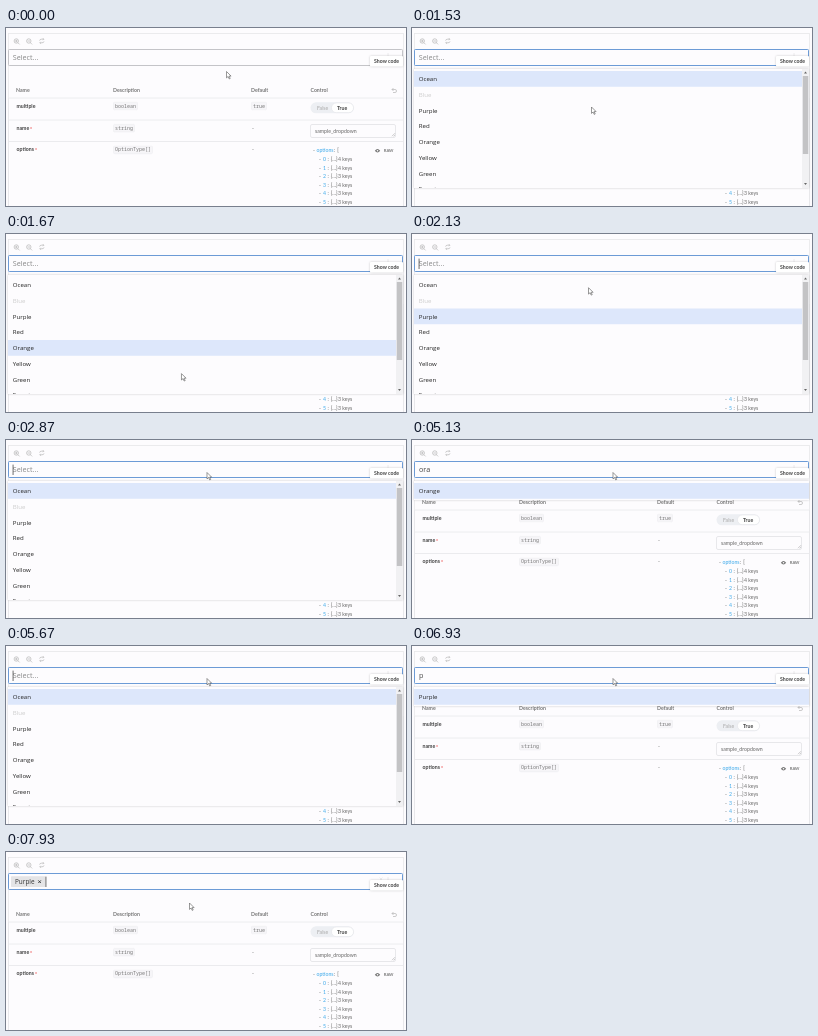
Recreate the animation shown at these times as an HTML page. Size 400 px wide and 178 px high, loop 8000 ms.

```html
<!DOCTYPE html>
<html lang="en">
<head>
<meta charset="utf-8">
<title>Dropdown demo</title>
<style>
  html, body { margin: 0; width: 100%; height: 100%; overflow: hidden; background: #fdfcfe; }
  svg { display: block; }
  text { font-family: Lato, sans-serif; font-size: 5.2px; fill: #666; white-space: pre; }
  .b { font-weight: 700; fill: #444; }
  .head { font-weight: 700; fill: #777; }
  .ui { font-family: "Open Sans", sans-serif; font-size: 6.1px; fill: #222; }
  .tag { font-family: "Open Sans", sans-serif; font-size: 6.4px; fill: #333; }
  .input { font-family: "Open Sans", sans-serif; font-size: 7.2px; fill: #444; }
  .mono { font-family: "Noto Sans Mono", monospace; font-size: 5px; fill: #777; }
  .key { fill: #3aa8ea; }
  .dim { fill: #aaa; }
  .line { fill: none; stroke: #e8e8ea; stroke-width: .8; }
  .icon { fill: none; stroke: #aaa; stroke-width: .6; }
  .shadow { filter: drop-shadow(0 .6px .8px #0003); }
</style>
</head>
<body>
<svg id="stage" width="100%" height="100%" viewBox="0 0 400 178"></svg>
<script>
const PAPER = '#fdfcfe';
const text = (x, y, s, cls = '') => `<text x="${x}" y="${y}" class="${cls}">${s}</text>`;
const rect = (x, y, w, h, fill, more = '') =>
  `<rect x="${x}" y="${y}" width="${w}" height="${h}" fill="${fill}" ${more}/>`;
const path = (d, cls, more = '') => `<path d="${d}" class="${cls}" ${more}/>`;
const chip = (x, y, s) =>
  rect(x, y - 5.3, s.length * 3 + 3, 7.6, '#f6f5f8', 'rx="1" stroke="#ededf0" stroke-width=".6"') +
  text(x + 1.5, y, s, 'mono');
const star = (x, y) => `<text x="${x}" y="${y + .6}" class="b" style="fill:#e66;font-size:6px">*</text>`;
const lens = (x, sign) =>
  path(`M${x + 2} 13a2.2 2.2 0 1 0-4.4 0a2.2 2.2 0 1 0 4.4 0M${x + 1.4} 14.7l1.7 1.7${sign}`, 'icon');

function page() {
  let s = rect(2.5, 5.5, 395, 200, PAPER, 'stroke="#e8e8ea" stroke-width=".8"');
  s += lens(10.5, 'M9.1 13h2.4M10.3 11.8v2.4') + lens(23, 'M21.6 13h2.4');
  s += path('M33.6 12.6q.2-1.4 2-1.4h2M36.9 10.2l1 1l-1 1M38 13.4q-.2 1.4-2 1.4h-2M34.7 13.8l-1 1l1 1', 'icon');
  s += [[10, 'Name'], [107, 'Description'], [245, 'Default'], [304.5, 'Control']]
    .map(([x, t]) => text(x, 63.5, t, 'head')).join('');
  s += path('M387.5 60l-1.5 1.5l1.5 1.5M386 61.5h3a1.5 1.5 0 0 1 0 3h-2', 'icon');
  s += path('M2.5 178V70H397.5V178M2.5 92H397.5M2.5 113.5H397.5', 'line');

  s += text(10.5, 79.5, 'multiple', 'b') + chip(107.5, 79.5, 'boolean') + chip(245.5, 79.5, 'true');
  s += rect(304.5, 74.3, 43.5, 11, '#edeff3', 'rx="5.5"');
  s += rect(325.5, 75, 22, 9.6, '#fff', 'rx="4.8" stroke="#e0e0e4" stroke-width=".5"');
  s += text(311, 81.6, 'False', 'dim') + text(331, 81.6, 'True', 'b');

  s += text(10.5, 102, 'name', 'b') + star(23.7, 102) + chip(107.5, 101.7, 'string') + text(246, 101.7, '-');
  s += rect(304.5, 96.5, 85, 13, PAPER, 'rx="1.5" stroke="#e2e2e6" stroke-width=".8"');
  s += text(309, 105, 'sample_dropdown') + path('M386 108.2l3-3M387.7 108.4l1.4-1.4', 'icon');

  s += text(10.5, 123.4, 'options', 'b') + star(28.8, 123.4) + chip(107.5, 123.4, 'OptionType[]') + text(246, 123.4, '-');
  s += text(307, 124, '-') + text(310.5, 124, 'options', 'key') + text(328, 124, ':') + text(331.3, 124, '[');
  [4, 4, 3, 4, 3, 3].forEach((n, i) => {
    const y = 133 + i * 8.6;
    s += text(313, y, '-') + text(317, y, i, 'key') + text(321.5, y, ':') +
      text(324.7, y, '{...}') + text(332, y, `${n} keys`);
  });
  s += rect(366, 118, 24, 9.5, PAPER, 'rx="1"');
  s += path('M368.8 122.8q2.7-3.6 5.4 0q-2.7 3.6-5.4 0', '', 'fill="#777"') + '<circle cx="371.5" cy="122.8" r=".8" fill="#fff"/>';
  s += `<text x="377.7" y="124.3" class="head" style="font-size:4.2px">RAW</text>`;
  return s;
}

const showCode =
  rect(364, 28, 33, 10.5, '#fff', 'rx="1" class="shadow"') + text(368, 35.1, 'Show code', 'b');

const stage = document.getElementById('stage');
stage.innerHTML = page() + '<g id="field"></g>' + showCode + '<g id="menu" class="shadow"></g>' +
  '<path id="cursor" d="M0 0V6.4L1.6 5L2.7 7.4L3.7 7L2.6 4.6H4.6Z" fill="#fff" stroke="#555" stroke-width=".6"/>';
const [field, menu, cursor] = ['field', 'menu', 'cursor'].map(id => document.getElementById(id));

const LOOP = 8000, OPEN = 730, PICK = 7930, ROW = 15.75;
const colors = ['Ocean', 'Blue', 'Purple', 'Red', 'Orange', 'Yellow', 'Green', 'Forest'];
const typed = [[0, ''], [3930, 'o'], [4400, 'or'], [4600, 'ora'], [5330, 'o'], [5530, ''], [6400, 'p'], [PICK, '']];
const blinks = [[0, 0], [OPEN, 1], [1270, 0], [1800, 1], [2330, 0], [2870, 1], [3400, 0], [3930, 1],
  [5130, 0], [5670, 1], [6200, 0], [6400, 1], [6930, 0], [7470, 1]];
const moves = [[0, 220.5, 43.5], [330, 253, 30.3], [470, 253, 30.3], [530, 253, 31], [1200, 253, 31],
  [1330, 235, 36], [1470, 195, 60], [1530, 179.5, 79], [1600, 176, 110], [1730, 175, 165], [1800, 175, 160],
  [2000, 176.5, 80], [2070, 177, 65], [2130, 176.5, 53.7], [2530, 201, 32.5], [7330, 201, 32.5],
  [7730, 183.5, 51], [LOOP, 183.5, 51]];
const caretX = { '': 7, o: 11.3, or: 14.3, ora: 18.3, p: 11.4 };

const at = (list, t) => list.findLast(e => e[0] <= t)[1];
const tick = k => Math.round(k * 20 / 3) * 10;   // 15 updates per second

function pointer(t) {
  const i = Math.max(1, moves.findIndex(m => m[0] >= t));
  const [a, x, y] = moves[i - 1], [b, u, v] = moves[i], f = (t - a) / (b - a);
  return [x + (u - x) * f, y + (v - y) * f];
}

// The highlight trails the pointer by one tick and skips the disabled row.
function activeRow(k) {
  let row = 0;
  for (let j = 19; j < Math.min(k, 39); j++) {
    const r = Math.floor((pointer(tick(j))[1] - 43) / ROW);
    if (r >= 0 && r < 7 && r !== 1) row = r;
  }
  return row;
}

function drawField(t, value, picked) {
  const border = t >= OPEN ? '#6c9bd6' : '#c4c4c8';
  let s = rect(2.5, 21.5, 394, 16, PAPER, `rx=".8" stroke="${border}"`);
  s += path('M382 25V35', 'line') + path('M387.5 28.5l2.5 2.5l2.5-2.5', 'icon');
  if (picked) {
    s += rect(5, 24.3, 34.5, 10.8, '#e4e4e6', 'rx=".8"') + text(9, 32, 'Purple', 'tag');
    s += path('M32.3 28.4l2.6 2.6m0-2.6l-2.6 2.6', '', 'stroke="#333" stroke-width=".9"');
    s += path('M373.5 25.5l3 3m0-3l-3 3', 'line');
  } else {
    s += value ? text(7, 32.4, value, 'input') : `<text x="6.8" y="32.4" class="input" style="fill:#888">Select...</text>`;
  }
  if (at(blinks, t)) s += rect(picked ? 39.6 : caretX[value] - .3, 24.6, .7, 10.4, '#333');
  field.innerHTML = s;
}

function drawMenu(t, value, active) {
  if (t < OPEN || t >= PICK) { menu.innerHTML = ''; return; }
  const items = colors.filter(c => c.toLowerCase().includes(value));
  const full = items.length === colors.length;
  const h = Math.min(119, items.length * ROW + 3.4);
  let s = rect(0, 0, 395, h, PAPER);
  items.forEach((c, i) => {
    const y = 2 + i * ROW;
    if (i === active) s += rect(0, y, full ? 388 : 395, ROW, '#dde7fb');
    s += `<text x="4.8" y="${y + 10}" class="ui"${c === 'Blue' ? ' style="fill:#ccc"' : ''}>${c}</text>`;
  });
  if (full) {
    s += rect(388, 0, 7, h, '#f1f1f3') + rect(388.8, 7, 5.4, 78, '#c3c3c5');
    s += path('M390 4.5l1.5-2l1.5 2zM390 114l1.5 2l1.5-2z', '', 'fill="#666"');
  }
  menu.innerHTML = `<svg x="2" y="41" width="395" height="${h}">${s}</svg>`;
}

let last = -1;
function frame(now) {
  const k = Math.floor((now % LOOP + 5) / (200 / 3)) % 120;
  if (k !== last) {
    last = k;
    const t = tick(k), value = at(typed, t);
    drawField(t, value, t >= PICK);
    drawMenu(t, value, t < 3930 ? activeRow(k) : 0);
    cursor.setAttribute('transform', `translate(${pointer(t)})`);
  }
  requestAnimationFrame(frame);
}
frame(0);
</script>
</body>
</html>
```
